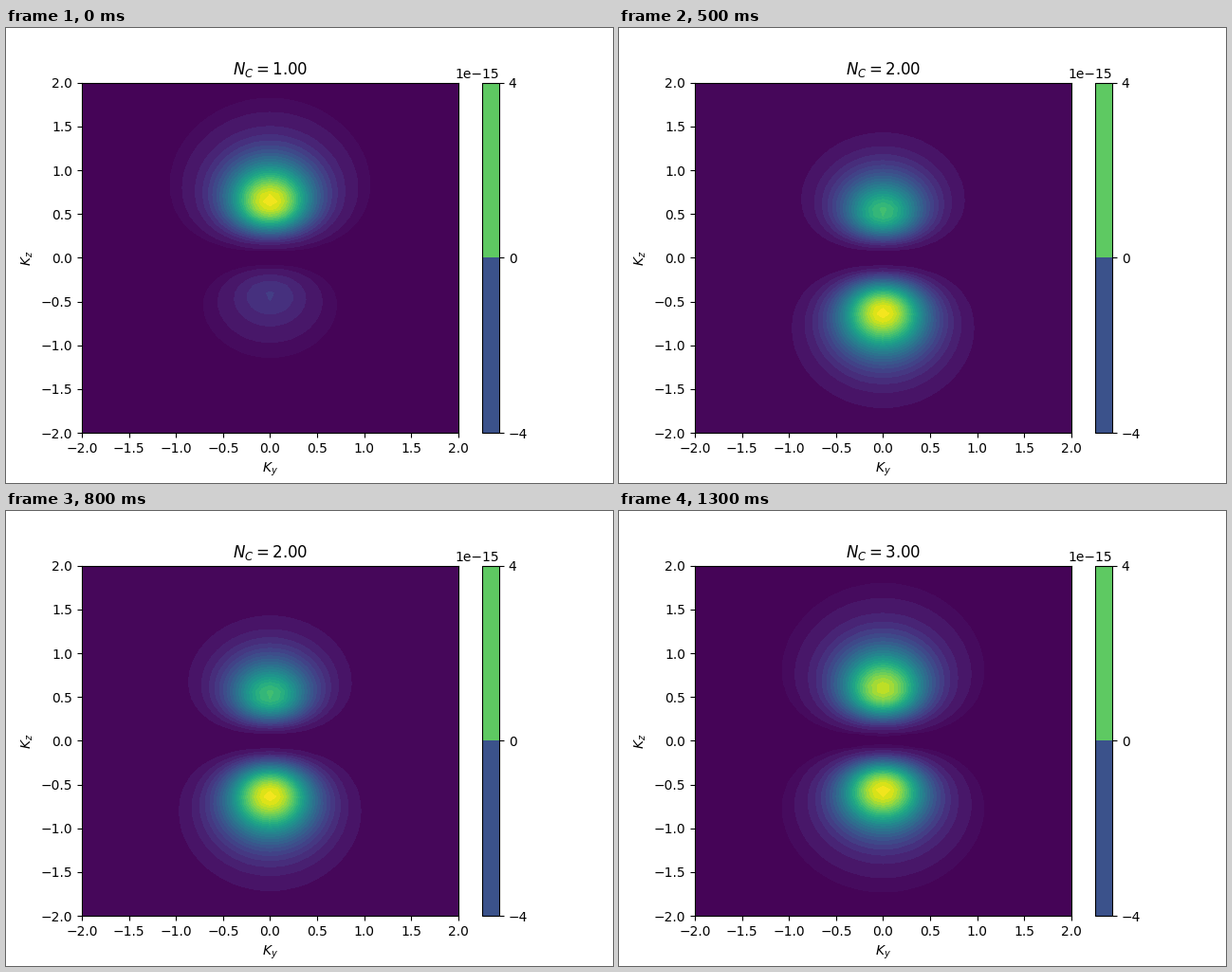
These frames come from a looping animation (640x480 px, 1500 ms). A matplotlib script:

```python
import numpy as np
import matplotlib.pyplot as plt
from matplotlib.animation import FuncAnimation

AXIS = np.linspace(-2, 2, 51)
KY, KZ = np.meshgrid(AXIS, AXIS)

# Level edges: fine near zero, then even steps
COARSE = np.arange(29)
FINE = np.r_[0, 1, np.arange(2, 51, 2)]

# Per state: levels, upper lobe, lower lobe
# Lobe: height, distance of the peak, offset, exponent, width factor
STATES = [
    (FINE, (49.5, 0.65, 0.32, 6.26, 1.08), (8.2, 0.43, 0.0, 5.5, 1.0)),
    (COARSE, (19.4, 0.53, 0.18, 6.0, 1.0), (27.7, 0.63, 0.27, 6.0, 1.13)),
    (FINE, (45.5, 0.60, 0.225, 6.0, 1.11), (49.5, 0.57, 0.215, 6.0, 1.03)),
]


def lobe(kz, height, peak, offset, power, width):
    """Momentum density of one half plane, zero where kz <= 0."""
    kz = np.maximum(kz, 0)
    q_peak = power * peak * (peak - offset)
    q = q_peak + (kz - offset) ** 2 - (peak - offset) ** 2 + width * KY ** 2
    return height * (kz / peak) ** 2 * (q_peak / q) ** power


fig, ax = plt.subplots(figsize=(6.4, 4.8), dpi=100)
flat = ax.contourf(KY, KZ, np.zeros_like(KY), levels=[-4e-15, 0, 4e-15])
fig.colorbar(flat, ax=ax)


def draw(i):
    levels, upper, lower = STATES[i % len(STATES)]
    density = lobe(KZ, *upper) + lobe(-KZ, *lower)
    ax.clear()
    ax.contourf(KY, KZ, density, levels=levels, vmin=0, vmax=levels[-1])
    ax.set_title(f"$N_C={i + 1:.2f}$")
    ax.set_xlabel("$K_y$")
    ax.set_ylabel("$K_z$")
    return []


anim = FuncAnimation(fig, draw, frames=len(STATES), interval=500,
                     init_func=lambda: [], repeat=True, repeat_delay=0)
plt.show()
```
